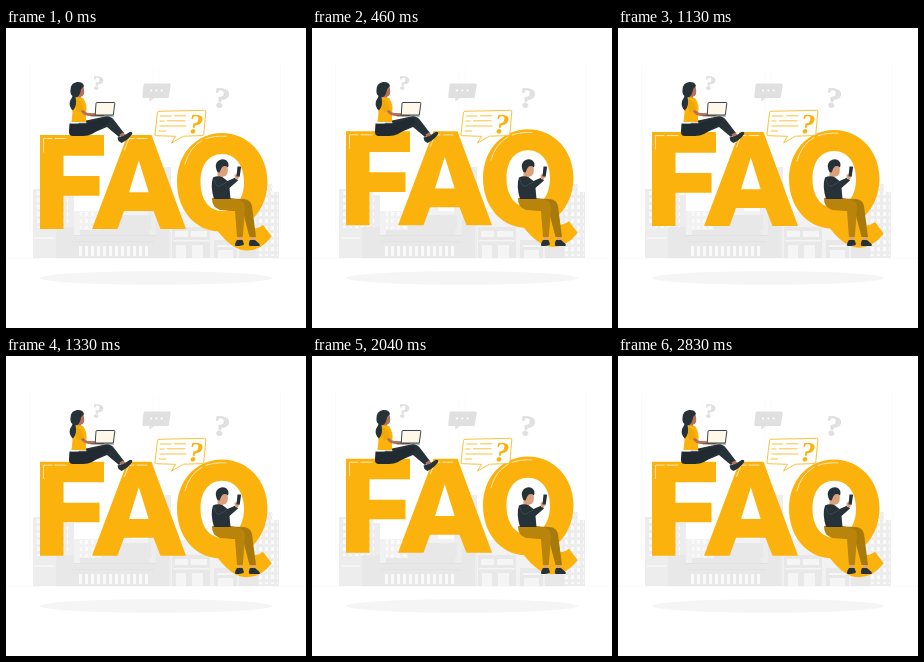
These frames come from a looping animation (300x300 px, 2870 ms). An HTML page:

```html
<!DOCTYPE html>
<html lang="en">
<head>
<meta charset="utf-8">
<title>FAQ</title>
<style>
  html, body { margin: 0; width: 100%; height: 100%; overflow: hidden; background: #fff; }
  svg { display: block; width: 100vw; height: 100vh; }
  text { font: bold 29px "Liberation Serif", serif; text-anchor: middle; }
  .line { fill: none; stroke-linecap: round; stroke-linejoin: round; }
</style>
</head>
<body>
<svg viewBox="0 0 300 300">
  <defs>
    <pattern id="grid" width="6" height="7" patternUnits="userSpaceOnUse">
      <path d="M1 2h3v4h-3z" fill="#fafafa"/>
    </pattern>
    <pattern id="arches" x="72" y="216" width="6" height="14" patternUnits="userSpaceOnUse">
      <path d="M1 12V2H4V12z" fill="#fafafa"/>
    </pattern>
  </defs>

  <path class="line" d="M23.500 202V38M147 202V38M153 202V38M274.500 202V38M0 230.300H300" stroke="#f5f5f5" stroke-width=".5"/>
  <ellipse cx="150" cy="250" rx="116" ry="6.800" fill="#f5f5f5"/>

  <g id="city">
    <path fill="#ededed" d="M27 230V161H34V156H62V167H68V230zM142 230V139H165V230zM250 230V156H266V164H273V230z"/>
    <path fill="#f2f2f2" d="M68 230V183H94V178H126V183H142V230zM165 230V184H250V230z"/>
    <path fill="url(#grid)" d="M28 163H62V200H28zM74 184H94V201H74zM252 158H272V228H252z"/>
    <path fill="#e8e8e8" d="M50 230V199H68V230zM96 202V187H145V202zM150 230V178H163V230z"/>
    <path fill="#e8e8e8" d="M67 230V207H74V202H143V207H150V230z"/>
    <path fill="url(#arches)" d="M72 216H145V230H72z"/>
    <path fill="#dfdfdf" d="M67 207H150V207.700H67zM69 213.500H148V214.200H69z"/>
    <path fill="#e8e8e8" d="M166 230V199H204V230zM208 230V212H231V230zM233 230V205H252V230z"/>
    <path fill="#f5f5f5" d="M169 203H182V209H169zM185 203H201V209H185zM167 212H203V213.500H167zM170 217H180V230H170zM186 217H197V230H186zM211 217H228V219H211zM212 222H227V230H212zM29 209H48V211H29z"/>
  </g>

  <g fill="#e0e0e0" stroke="#e0e0e0" stroke-width=".8">
    <text transform="translate(90.800 61.500) rotate(10) scale(.82 .68)">?</text>
    <text transform="translate(214 79.500) rotate(10) scale(1.120 .98)">?</text>
    <path stroke="none" d="M139 55.500H163.500Q165 55.500 164.700 57L163 68.500Q162.700 70 161 70H148L143.500 73.500L143.300 70H138Q136 70 136.300 68.500L137.500 57Q137.700 55.500 139 55.500z"/>
  </g>
  <path class="line" stroke="#fff" d="M145 62.500h.1M150.300 62.500h.1M155.600 62.500h.1" stroke-width="2"/>

  <g id="letters" fill="#fcb20c">
    <path d="M34 107H98V127.700H57.500V148H93.500V167.700H57.500V201H34z"/>
    <path fill-rule="evenodd" d="M86 201L121.500 107H145.500L180 201H154.500L147.500 183H118L111.500 201zM132.800 132.500L123 164.300H142.700z"/>
    <path fill-rule="evenodd" d="M216 104.900C242 104.900 261.500 126 261.500 153.500C261.500 171 254 186 242 195Q243.500 200.500 247.500 200.500Q252 200.500 257 197L265.700 208.500Q255 222.600 241 222.600Q227 222.600 212 203.500C188 202 171 181 171 154C171 126 190 104.900 216 104.900zM216 126C202 126 194.500 138 194.500 154C194.500 171 203 183 216 183C229 183 238 171 238 154C238 138 230 126 216 126z"/>
    <path class="line" stroke="#fff" stroke-width=".7" d="M37.500 124V110.500H46M49 110.500H60M118.500 122L123 110.500H128M131 110.500H141M179 136Q183 120 196 112.500M200 110.700Q209 107.500 220 108.200"/>
  </g>

  <g id="bubble">
    <path d="M153 83.300L198.500 82.300Q200 82.300 199.800 84L197.800 106Q197.600 107.600 196 107.600L177.500 108.200L165.500 115L169.500 108.300L150.500 107.700Q148.700 107.700 149 106L151.500 84.700Q151.700 83.300 153 83.300z" fill="#fff" stroke="#fcb20c" stroke-width=".8" stroke-linejoin="round"/>
    <path class="line" stroke="#fcb20c" stroke-width=".8" d="M154.500 88H165M168.500 87.800H180M154 93H158M161.500 92.800H179M153.700 98H180M153 103H159.500"/>
    <text transform="translate(187.500 105.300) rotate(6) skewX(-8) scale(1 .97)" fill="#fcb20c">?</text>
  </g>

  <g id="woman">
    <path fill="#263238" d="M73 94L99 88.500Q104.500 87.500 108 92L118 105L113 109L101 99L82 107H70z"/>
    <path fill="#202a30" d="M63.500 95.500H80L101 89.500Q105 91 102 95.500L86 106Q82 108 77 108H67Q62.500 108 63 103z"/>
    <path fill="#b5725a" d="M113.500 106.500L117 104.500L120 107L116 111z"/>
    <path fill="#263238" d="M111.500 109.500L117.500 108L124 103.800Q127 103.800 126 106.200Q122 112 115.500 115L112.500 113z"/>
    <path fill="#b5725a" d="M72 61Q74 56 77.500 58.500L78.300 63.500Q78 68.500 75 68.500V72H70z"/>
    <path fill="#fcb20c" d="M68 70Q73 68.500 77.500 70.500Q82 78 80 85V94H65.500L66.500 84Q65 76 68 70z"/>
    <path class="line" stroke="#fff" stroke-width="1" d="M65 94.700H80"/>
    <path class="line" stroke="#b5725a" stroke-width="2.800" d="M75 81Q78 86.500 83 86.500L97 86.800"/>
    <path fill="#f0a808" d="M70 72Q74 71 76 76L78 81.500L72 84.500Q68.500 80 70 72z"/>
    <path fill="#263238" d="M64.500 62Q64.500 55 71 54Q77 53.500 78 58Q75 60 74.500 64Q73 69 69.500 69.500Q71.500 77 67 82.500Q62.500 79 64 73Q66 70 66.500 68Q64 66 64.500 62z"/>
    <path fill="#fff8e8" stroke="#263238" stroke-width=".9" stroke-linejoin="round" d="M91 74.500H108.200Q109 74.500 108.800 75.500L107.300 87H89.200L90 75.500Q90.100 74.500 91 74.500z"/>
    <path class="line" stroke="#263238" stroke-width=".6" d="M85 88H107.500"/>
  </g>

  <g id="man">
    <path fill="#a8790b" d="M214 170L238 171Q245 172 246 178L250 209H243.500L237 184L214 181z"/>
    <path fill="#b8840c" d="M206 170H225L235 172.500Q239.500 175 239 181L236.800 209H231L229 183L214 182Q205.500 179 206 170z"/>
    <path fill="#dca07c" d="M232 209H236V213H232zM245 209H249V213H245z"/>
    <path fill="#263238" d="M231 212H236.500L238 216Q237.500 218 229.500 218Q228 216.500 231 212zM244 212H249L253.500 216Q254.500 218 252.500 218H243.500Q242 216 244 212z"/>
    <path fill="#dca07c" d="M211.500 141L220.500 136.500Q222.800 141 221.500 145.500Q219.500 149 217 148.500V151.500H211.500z"/>
    <path fill="#263238" d="M207 149.500Q212 147 217 149.500L221.500 153L229.500 149.500L232 152.500L223.500 160L224.500 171H208Q204 158 207 149.500z"/>
    <path class="line" stroke="#4a5860" stroke-width=".6" d="M208.500 152Q209 159 214 158L221 154"/>
    <path fill="#263238" d="M210.500 142Q208.500 136 212 133Q216 129.800 220.500 132.500Q223.500 135 222 139.500Q218 136.500 215.500 140L213.500 144.500Q211.500 145 210.500 142z"/>
    <path fill="#dca07c" d="M228.500 147L232 145L233.800 148.500L231.500 151.500L229 151z"/>
    <path fill="#263238" d="M231.500 138.500H234.300Q235.300 138.500 235 139.500L233.700 148.500H230.500z"/>
  </g>
</svg>
<script>
  const LOOP = 2870, BOB = 1500, LIFT = 6;
  const letters = document.getElementById("letters");

  // Linear rise and fall, cut short where the loop restarts.
  function draw(now) {
    const phase = now % LOOP % BOB / BOB;
    const y = -LIFT * (1 - Math.abs(2 * phase - 1));
    letters.setAttribute("transform", `translate(0 ${y})`);
    requestAnimationFrame(() => draw(performance.now() - start));
  }

  const start = performance.now();
  draw(0);
</script>
</body>
</html>
```
